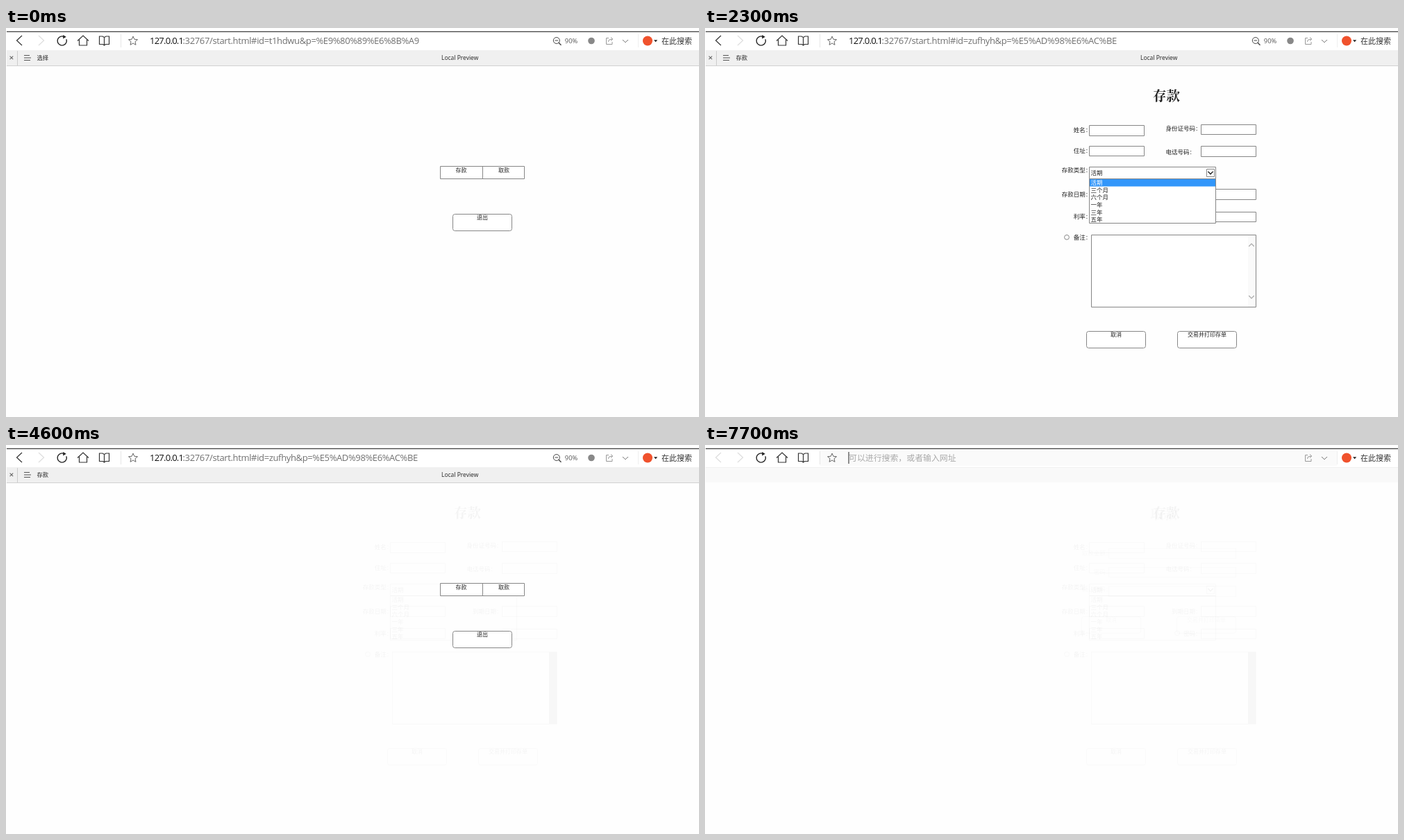
Write an HTML page with a canvas that moves like this. It is 998x561 px and loops after 8 s.

```html
<!DOCTYPE html>
<html lang="zh">
<head>
<meta charset="utf-8">
<title>Local Preview</title>
<style>
html, body { margin: 0; width: 100%; height: 100%; overflow: hidden; background: #fefefe; }
canvas { display: block; width: 998px; height: 561px; }
</style>
</head>
<body>
<canvas id="stage" width="998" height="561"></canvas>
<script>
const ctx = document.getElementById('stage').getContext('2d');
const LOOP = 8000;
const CJK = '"Noto Sans CJK SC", "Noto Sans CJK", sans-serif';
const UI = '"Open Sans", "Noto Sans CJK SC", "Noto Sans CJK", sans-serif';
const SERIF = '"Noto Serif CJK SC", "Noto Sans CJK SC", "Noto Sans CJK", serif';
const LINE = '#868686', INK = '#222';

const tabs = {
  choice: { title: '选择', hash: 't1hdwu&p=%E9%80%89%E6%8B%A9' },
  deposit: { title: '存款', hash: 'zufhyh&p=%E5%AD%98%E6%AC%BE' },
  withdraw: { title: '取款', hash: 'r8nk3s&p=%E5%8F%96%E6%AC%BE' }
};
const terms = ['活期', '三个月', '六个月', '一年', '三年', '五年'];

function text(s, x, y, { size = 8.5, font = CJK, color = INK, align = 'left', gap = 0, weight = 400 } = {}) {
  ctx.font = `${weight} ${size}px ${font}`;
  ctx.letterSpacing = gap + 'px';
  ctx.fillStyle = color;
  ctx.textAlign = align;
  ctx.textBaseline = 'alphabetic';
  ctx.fillText(s, x, y + size * 0.37);
}

function fill(x, y, w, h, color) {
  ctx.fillStyle = color;
  ctx.fillRect(x, y, w, h);
}

function path(points, color = '#333', width = 1.2, close = false) {
  ctx.beginPath();
  points.forEach(([x, y]) => ctx.lineTo(x, y));
  if (close) ctx.closePath();
  ctx.strokeStyle = color;
  ctx.lineWidth = width;
  ctx.stroke();
}

function circle(x, y, r, color, solid = false) {
  ctx.beginPath();
  ctx.arc(x, y, r, 0, Math.PI * 2);
  ctx.lineWidth = 1;
  ctx.fillStyle = ctx.strokeStyle = color;
  solid ? ctx.fill() : ctx.stroke();
}

function box(x, y, w, h, r = 0) {
  ctx.beginPath();
  ctx.roundRect(x + 0.5, y + 0.5, w, h, r);
  ctx.fillStyle = '#fff';
  ctx.fill();
  ctx.strokeStyle = LINE;
  ctx.lineWidth = 1;
  ctx.stroke();
}

function button(label, x, y, w = 85) {
  box(x, y, w, 24, 3);
  text(label, x + w / 2 + 0.5, y + 5.5, { size: 8, align: 'center' });
}

// Labels end in a half-width colon cell
function label(s, x, y) {
  text(s, x - 4.3, y, { align: 'right' });
  text(':', x - 2.1, y, { align: 'center' });
}

const heading = (s, x, y) => text(s, x, y, { size: 19.5, font: SERIF, align: 'center', weight: 600 });

// Browser chrome

function reload(angle) {
  ctx.save();
  ctx.translate(80.7, 18.5);
  ctx.rotate(angle);
  ctx.beginPath();
  ctx.arc(0, 0, 6.6, -0.35, Math.PI * 1.6);
  ctx.strokeStyle = '#222';
  ctx.lineWidth = 1.4;
  ctx.stroke();
  ctx.beginPath();
  ctx.moveTo(1.5, -8.6);
  ctx.lineTo(6, -5.8);
  ctx.lineTo(1.5, -3);
  ctx.fillStyle = '#222';
  ctx.fill();
  ctx.restore();
}

function star(x, y, r) {
  const points = Array.from({ length: 10 }, (_, i) => {
    const a = i * Math.PI / 5 - Math.PI / 2, d = i % 2 ? r * 0.46 : r;
    return [x + d * Math.cos(a), y + d * Math.sin(a)];
  });
  path(points, '#666', 1, true);
}

function toolbar(blank, angle) {
  fill(0, 0, 998, 32, '#fff');
  fill(1, 4.7, 997, 1.3, '#444');
  if (blank) fill(165, 8, 745, 22, '#fafafa');
  path([[23, 11], [15.5, 18], [23, 25]], blank ? '#ddd' : '#333', 1.2);
  path([[47, 11], [54.5, 18], [47, 25]], '#ddd', 1.2);
  reload(angle);
  path([[103, 18.5], [111, 11], [119, 18.5]], '#333', 1.2);
  path([[105.5, 17], [105.5, 25], [116.5, 25], [116.5, 17]], '#333', 1.2);
  path([[141.5, 13.5], [139, 12], [134.5, 12], [134.5, 23.5], [139.5, 23.5], [141.5, 25],
    [143.5, 23.5], [148.5, 23.5], [148.5, 12], [144, 12], [141.5, 13.5], [141.5, 25]], '#333', 1.2);
  fill(165, 9, 1, 19, '#e6e6e6');
  star(183, 18.8, 6.8);

  if (!blank) {
    circle(792.8, 18, 4.5, '#444');
    path([[790.5, 18], [795, 18]], '#444', 1);
    path([[796, 21.3], [799.5, 24.7]], '#444', 1.4);
    text('90%', 804.8, 19, { size: 9.4, font: UI, color: '#555' });
    circle(843, 18.5, 4.8, '#888', true);
  }
  path([[868, 14.5], [864.5, 14.5], [864.5, 23.5], [873, 23.5], [873, 20]], '#999', 1);
  path([[867.5, 20], [868.5, 17], [873.5, 16]], '#999', 1);
  path([[871, 13.5], [873.8, 16], [871, 18.5]], '#999', 1);
  path([[888, 17], [892, 20.8], [896, 17]], '#777', 1);
  fill(910, 9, 1, 19, '#eee');
  circle(924, 18.5, 7, '#f0522d', true);
  ctx.beginPath();
  ctx.moveTo(933, 17.2);
  ctx.lineTo(938.2, 17.2);
  ctx.lineTo(935.6, 20.2);
  ctx.fillStyle = '#222';
  ctx.fill();
  text('在此搜索', 944, 18.8, { size: 11, color: '#333' });
}

function address(tab) {
  text('127.0.0.1', 207, 18.4, { size: 13, font: UI, color: '#111', gap: -0.75 });
  text(':32767/start.html#id=' + tab.hash, 254.5, 18.4, { size: 13, font: UI, color: '#707070', gap: -0.36 });
}

function tabBar(tab) {
  fill(1, 32, 997, 22, tab ? '#f0f0f0' : '#f9f9f9');
  if (!tab) {
    fill(1, 32, 997, 1, '#f0f0f0');
    return;
  }
  fill(1, 54, 997, 1, '#d0d0d0');
  path([[5.6, 40.6], [10.2, 45.2]], '#666', 1.1);
  path([[10.2, 40.6], [5.6, 45.2]], '#666', 1.1);
  fill(16, 33, 1, 21, '#ccc');
  fill(26, 39, 8, 1, '#555');
  fill(26, 42.5, 10, 1, '#555');
  fill(26, 46, 9, 1, '#555');
  text(tab.title, 44.5, 42.5, { size: 8.3 });
  text('Local Preview', 627, 43.3, { size: 8.5, font: UI });
}

// Pages

function choice() {
  box(625, 199, 121, 18);
  fill(686, 199, 1, 18, LINE);
  text('存款', 655.5, 205, { size: 8, align: 'center' });
  text('取款', 717, 205, { size: 8, align: 'center' });
  button('退出', 643, 268);
}

function termField(selected) {
  box(553, 200, 182, 17);
  if (selected) fill(555, 204, 166, 10, '#3296fa');
  text('活期', 555.5, 209, { color: selected ? '#fff' : INK });
  box(722, 203, 11, 11);
  path([[724.5, 207], [728, 210.7], [731.5, 207]], '#222', 1.4);
}

function termList() {
  box(553, 217, 182, 64);
  fill(554, 218, 181, 10.5, '#3296fa');
  terms.forEach((s, i) => text(s, 555.5, 223 + i * 10.6, { color: i ? INK : '#fff' }));
}

function deposit(selected) {
  heading('存款', 664.5, 97.5);
  [[140, 139], [170, 170], [232, 232], [264, 265]].forEach(([left, right]) => {
    box(553, left, 79, left === 170 ? 14 : 15);
    box(714, right, 79, right === 232 || right === 170 ? 15 : 14);
  });
  label('姓名', 552, 147);
  label('住址', 552, 176.5);
  label('存款类型', 552, 204.5);
  label('存款日期', 552, 239.5);
  label('利率', 552, 271.5);
  label('备注', 552, 302);
  label('身份证号码', 710.3, 145);
  label('电话号码', 701.7, 179);
  label('到期日期', 710.3, 239.5);
  label('密码', 710.3, 271.5);
  circle(680, 271.3, 3.4, '#888');
  circle(521, 301.8, 3.4, '#888');
  termField(selected);
  box(556, 298, 237, 104);
  fill(782, 299, 11, 103, '#fafafa');
  path([[783.2, 315], [787, 311.2], [790.8, 315]], '#aaa', 1.2);
  path([[783.2, 386], [787, 389.8], [790.8, 386]], '#aaa', 1.2);
  button('取消', 549, 437);
  button('交易并打印存单', 680, 437);
}

function withdraw() {
  heading('取款', 660.5, 99.5);
  [['取款金额', 149, 156], ['密码', 176, 182.5], ['确认密码', 203, 208]].forEach(([s, y, mid]) => {
    label(s, 581, mid);
    box(581, y, 183, y === 203 ? 15 : 14);
  });
  button('取消', 542, 247);
  button('交易并打印清单', 679, 247);
}

function faint(alpha, draw) {
  ctx.save();
  ctx.globalAlpha = alpha;
  draw();
  ctx.restore();
}

function residue() {
  faint(0.045, () => {
    deposit(false);
    ctx.strokeStyle = LINE;
    ctx.strokeRect(553.5, 217.5, 182, 64);
    terms.forEach((s, i) => text(s, 555.5, 223 + i * 10.6));
  });
  fill(782, 299, 11, 103, '#f7f7f7');
}

function pageAt(t) {
  if (t < 500) return 'choice';
  if (t < 4600) return 'deposit';
  if (t < 6200) return 'choice';
  return t < 7500 ? 'withdraw' : 'blank';
}

const loads = [[600, 1300], [4700, 5500], [6300, 7000]];

function render(t) {
  const page = pageAt(t);
  const tab = tabs[pageAt(Math.max(0, t - 100))];
  const load = loads.find(([from, to]) => t >= from && t < to);
  const angle = load ? (Math.floor((t - load[0]) / 100) + 1) * Math.PI / 4 : 0;

  fill(0, 0, 998, 561, '#fefefe');
  if (t >= 4600) residue();
  if (page === 'choice') choice();
  if (page === 'deposit') {
    deposit(t >= 2700 && t < 4200);
    if (t >= 2300 && t < 2600) termList();
  }
  if (page === 'withdraw') {
    fill(635, 84, 55, 32, '#fefefe');
    withdraw();
  }
  if (page === 'blank') faint(0.025, withdraw);

  toolbar(!tab, angle);
  tabBar(tab);
  if (tab) address(tab);
  else {
    text('可以进行搜索，或者输入网址', 207, 19, { size: 11.9, color: '#aaa' });
    if (t >= 7700) fill(206.5, 10, 1, 17, '#222');
  }
}

const start = performance.now();
function tick() {
  render((performance.now() - start) % LOOP);
  requestAnimationFrame(tick);
}
tick();
</script>
</body>
</html>
```
